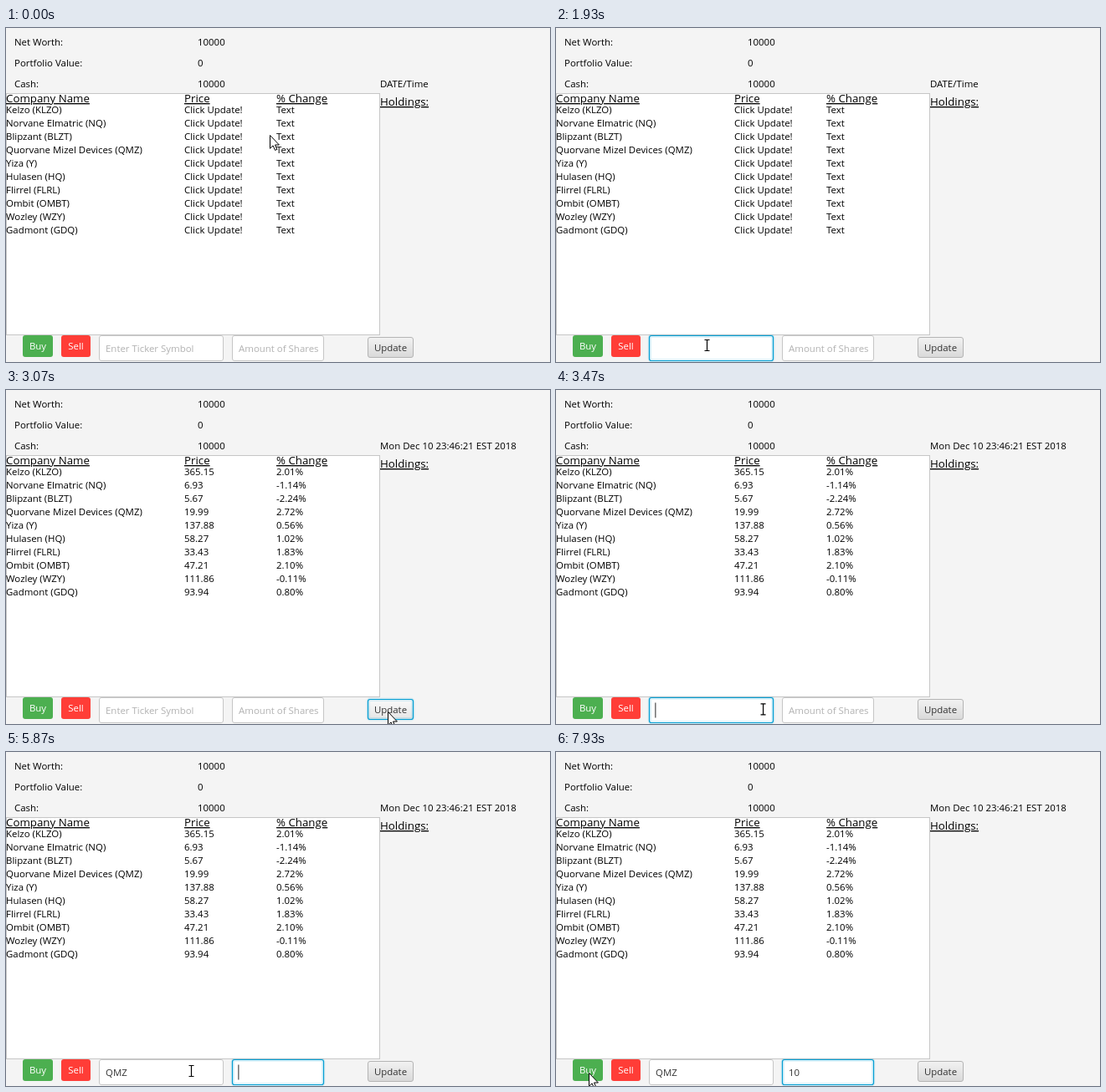
Write an HTML page that moves like this. It is 650x400 px and loops after 8000 ms.

```html
<!DOCTYPE html>
<html lang="en">
<head>
<meta charset="utf-8">
<title>Stock simulator</title>
<style>
  html, body { margin: 0; width: 100%; height: 100%; overflow: hidden; background: #f4f4f4; }
  svg { display: block; width: 650px; height: 400px; }
  text { font: 11.45px "Open Sans", "Noto Sans", sans-serif; white-space: pre; }
  .head { font-size: 13.3px; text-decoration: underline; }
  .label { text-anchor: middle; fill: #fff; }
  .box { fill: #fff; stroke: #c6c6c6; }
  .button { fill: url(#idle); stroke: #b4b4b4; }
  .hover { fill: url(#lit); }
  .focus { stroke: #039ed3; stroke-width: 1.2; }
  .glow { fill: none; stroke: #039ed3; stroke-width: 4.4; opacity: 0; }
  .focus + .glow { opacity: .133; }
</style>
</head>
<body>
<svg id="stage" viewBox="0 0 650 400">
  <defs>
    <linearGradient id="idle" x2="0" y2="1"><stop stop-color="#f2f2f2"/><stop offset="1" stop-color="#d9d9d9"/></linearGradient>
    <linearGradient id="lit" x2="0" y2="1"><stop stop-color="#fafafa"/><stop offset="1" stop-color="#e5e5e5"/></linearGradient>
  </defs>
  <rect x=".5" y="78.5" width="446" height="289" class="box"/>
  <rect x="20" y="368" width="36" height="26" rx="3" fill="#4caf50"/>
  <rect x="66" y="368" width="35" height="26" rx="3" fill="#ff3d37"/>
  <text x="38" y="385" class="label">Buy</text>
  <text x="83.5" y="385" class="label">Sell</text>
</svg>
<script>
const stage = document.getElementById('stage');

function add(tag, attrs, content = '') {
  const el = document.createElementNS('http://www.w3.org/2000/svg', tag);
  for (const key in attrs) el.setAttribute(key, attrs[key]);
  el.textContent = content;
  stage.append(el);
  return el;
}
const label = (x, y, content, cls = '') => add('text', { x, y, class: cls }, content);

function control(x, y, width, height, cls) {
  const inset = (d, rx, cls) =>
    add('rect', { x: x + d, y: y + d, width: width - 2 * d, height: height - 2 * d, rx, class: cls });
  const box = inset(.5, 2.5, cls);
  inset(.8, 2.2, 'glow');
  return box;
}

// Returns a setter that gives back the caret position.
function field(x, width, hint) {
  const box = control(x, 368, width, 31, 'box');
  const text = label(x + 8, 388, hint);
  return (value, focused) => {
    box.classList.toggle('focus', focused);
    text.textContent = value || (focused ? '' : hint);
    text.style.fill = value ? '#333' : '#b2b2b2';
    return x + 7 + (value ? text.getComputedTextLength() : 0);
  };
}

['Net Worth:', 'Portfolio Value:', 'Cash:'].forEach((name, i) => {
  label(10, 21 + i * 25, name);
  label(229, 21 + i * 25, i === 1 ? '0' : '10000');
});
const date = label(447, 71, '');
label(0, 89, 'Company Name', 'head');
label(213, 89, 'Price', 'head');
label(323, 89, '% Change', 'head');
label(447, 93, 'Holdings:', 'head');

const quotes = `Kelzo (KLZO)|365.15|2.01%
Norvane Elmatric (NQ)|6.93|-1.14%
Blipzant (BLZT)|5.67|-2.24%
Quorvane Mizel Devices (QMZ)|19.99|2.72%
Yiza (Y)|137.88|0.56%
Hulasen (HQ)|58.27|1.02%
Flirrel (FLRL)|33.43|1.83%
Ombit (OMBT)|47.21|2.10%
Wozley (WZY)|111.86|-0.11%
Gadmont (GDQ)|93.94|0.80%`.split('\n').map((line, i) => {
  const [name, price, change] = line.split('|');
  const y = 102 + i * 16;
  label(0, y, name);
  return { price, change, priceCell: label(213, y, ''), changeCell: label(323, y, '') };
});

const setTicker = field(111, 149, 'Enter Ticker Symbol');
const setShares = field(270, 110, 'Amount of Shares');
const update = control(432, 370, 55, 25, 'button');
label(459.5, 387, 'Update', 'label').style.fill = '#333';
const caret = add('rect', { y: 374.5, width: 1.6, height: 18, fill: '#777' });
const arrow = add('path', { d: 'M.5.5V16.3L4.1 12.9 6.5 18.4 8.9 17.4 6.5 12H11.4Z', fill: '#fff', stroke: '#000' });
const beam = add('path', { d: 'M-3-6.5H3M-3 6.5H3M0-6.5V6.5', fill: 'none', stroke: '#000', 'stroke-width': 1.2 });

// The screen refreshes 15 times a second; all times below are in these ticks.
const FIRST_CLICK = 29, LOAD = 45, SECOND_CLICK = 52, TAB = 88;
const tickerKeys = [73, 76, 83], shareKeys = [104, 105];
const blinkStarts = [FIRST_CLICK + 1, SECOND_CLICK, ...tickerKeys, TAB, ...shareKeys];

// Pointer stops: tick, x, y
const stops = [
  [0, 315, 128], [1, 315, 128], [3, 358, 127],
  [9, 64, 357], [10, 54, 360], [13, 54, 360], [16, 274, 302], [20, 410, 256], [26, 182, 371], [28, 180.5, 380],
  [32, 180.5, 380], [36, 467, 384], [37, 462, 385], [44, 462, 385], [46, 456, 385], [55, 221.5, 382],
  [112, 221.5, 382], [116, 62, 368], [118, 39, 384], [120, 39, 384]
];

function pointer(tick) {
  const i = stops.findIndex(stop => stop[0] > tick);
  const [t0, x0, y0] = stops[i - 1], [t1, x1, y1] = stops[i];
  const ease = 1 - (1 - (tick - t0) / (t1 - t0)) ** 2;
  return [x0 + (x1 - x0) * ease, y0 + (y1 - y0) * ease];
}

const between = (value, from, to) => value >= from && value < to;
const typed = (word, keys, tick) => word.slice(0, keys.filter(key => key <= tick).length);
const show = (el, visible) => el.style.display = visible ? '' : 'none';

function draw(tick) {
  const loaded = tick >= LOAD;
  date.textContent = loaded ? 'Mon Dec 10 23:46:21 EST 2018' : 'DATE/Time';
  for (const q of quotes) {
    q.priceCell.textContent = loaded ? q.price : 'Click Update!';
    q.changeCell.textContent = loaded ? q.change : 'Text';
  }

  const onTicker = between(tick, FIRST_CLICK, LOAD) || between(tick, SECOND_CLICK, TAB);
  const onShares = tick >= TAB;
  const tickerEnd = setTicker(typed('QMZ', tickerKeys, tick), onTicker);
  const sharesEnd = setShares(typed('10', shareKeys, tick), onShares);
  const blinkStart = blinkStarts.findLast(start => start <= tick);
  caret.setAttribute('x', onShares ? sharesEnd : tickerEnd);
  show(caret, (onTicker || onShares) && (tick - blinkStart) % 15.5 < 7.5);

  const [x, y] = pointer(tick);
  const inField = y >= 368 && (between(x, 111, 260) || between(x, 270, 380));
  const visible = !between(tick, 4, 9);
  for (const shape of [arrow, beam]) shape.setAttribute('transform', `translate(${x} ${y})`);
  show(arrow, visible && !inField);
  show(beam, visible && inField);

  update.classList.toggle('focus', between(tick, LOAD, SECOND_CLICK));
  update.classList.toggle('hover', loaded && between(x, 432, 487));
}

const begin = performance.now();
function loop() {
  const time = (performance.now() - begin) % 8000;
  draw(Math.min(119, Math.floor(time * .015 + .06)));
  requestAnimationFrame(loop);
}
loop();
</script>
</body>
</html>
```
